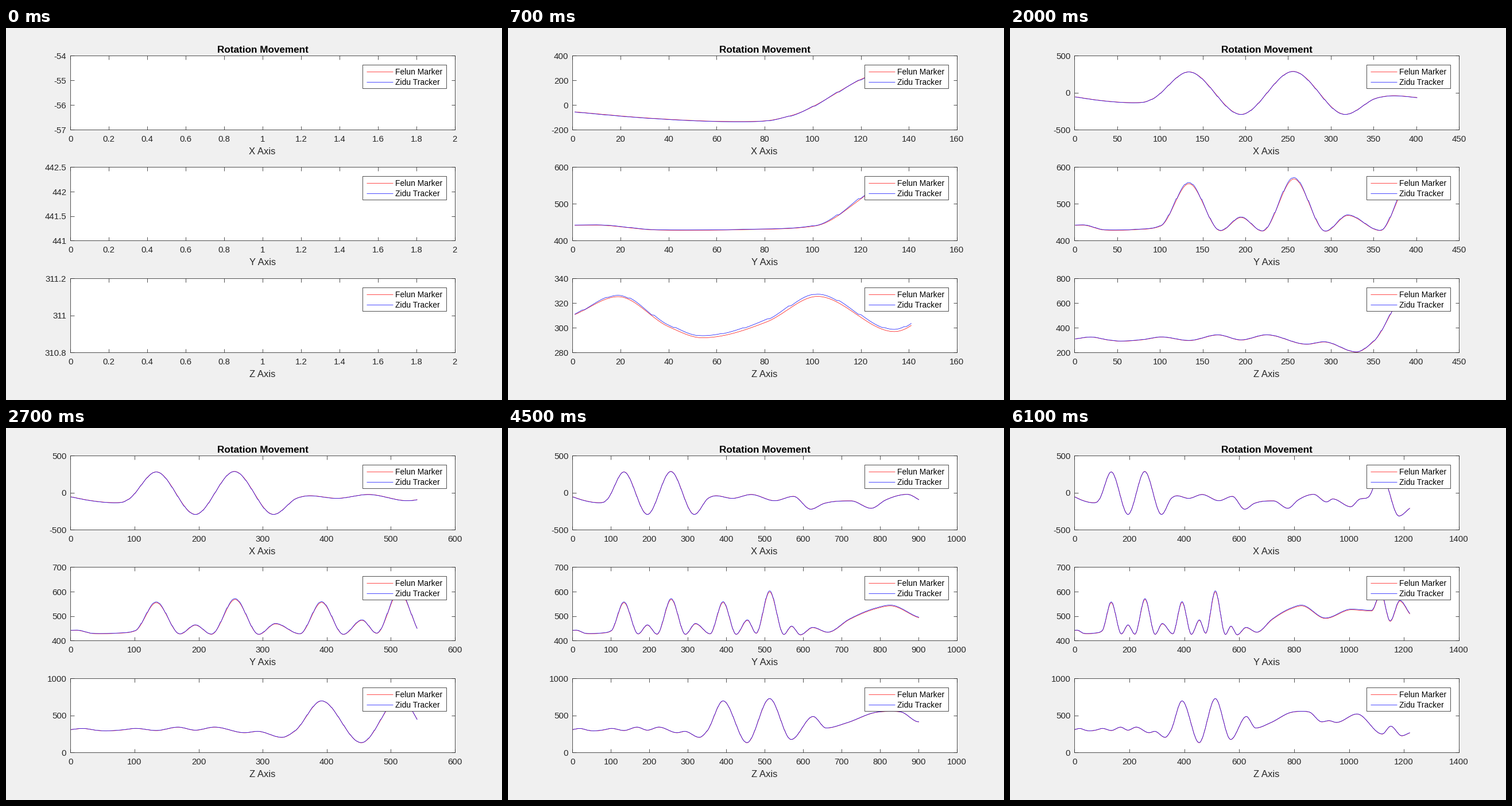
Animation, 864 px wide and 648 px high, one loop 6.2 s. Source, as a matplotlib script:

```python
import math

import matplotlib.pyplot as plt
import numpy as np
from matplotlib.animation import FuncAnimation
from matplotlib.patches import Rectangle

W, H = 864, 648
FRAMES, INTERVAL = 62, 100
SAMPLES_PER_FRAME = 20
LEFT, RIGHT = 112.3, 781.9
PANELS = [(48.4, 177.4), (242.4, 370.4), (436.4, 565.4)]
INK, RED, BLUE = "#262626", "#ff0000", "#0000ff"
FRAME_WIDTH, CURVE_WIDTH = 0.8, 0.7

plt.rcParams["font.family"] = "Liberation Sans"

# Turning points (sample, value) of the marker; easing fills in the rest.
TURNS_X = [
    (1, -54.2), (30, -102.5), (69, -133), (81, -126), (90, -90), (134, 283),
    (195, -291), (256, 289), (317, -291), (354, -70), (374, -39), (416, -74),
    (465, -22), (526, -106), (575, -47), (620, -220), (655, -142),
    (725, -108), (777, -208), (815, -95), (871, -20), (918, -122), (941, -82),
    (1006, -187), (1036, -90), (1071, -55), (1116, 270), (1182, -312),
    (1221, -208),
]
TURNS_Y = [
    (1, 441.45), (10, 442), (34, 429.2), (45, 428.3), (70, 429.8), (101, 440),
    (134, 555), (171, 427), (195, 463), (220, 426), (257, 568), (294, 425.5),
    (320, 468.5), (358, 427.5), (392, 556), (426, 425.5), (455, 483),
    (478, 430), (513, 599), (550, 425), (570, 458), (593, 423.5), (625, 453),
    (664, 434), (720, 486), (788, 530), (827, 542), (914, 490.5), (1008, 526),
    (1082, 521), (1116, 592), (1150, 479), (1185, 561), (1221, 509),
]
TURNS_Z = [
    (1, 310.85), (19, 325.3), (40, 301), (54, 292), (81, 305), (102, 325.5),
    (134, 297), (168, 342.5), (195, 301.5), (225, 343), (272, 267),
    (292, 286), (330, 204.5), (350, 289), (392, 697), (454, 133), (513, 728),
    (569, 176), (626, 486), (660, 331), (715, 403), (788, 541), (828, 556),
    (855, 547), (901, 414), (927, 430), (954, 406), (1029, 520), (1121, 250),
    (1152, 355), (1192, 226), (1221, 266),
]


def smooth(knots):
    """Cubic Hermite curve through the knots, flat at local extrema."""
    t, v = np.array(knots, float).T
    h = np.diff(t)
    d = np.diff(v) / h
    m = np.gradient(v, t)
    cap = 3 * np.minimum(abs(d[:-1]), abs(d[1:]))
    m[1:-1] = np.where(d[:-1] * d[1:] > 0, np.clip(m[1:-1], -cap, cap), 0)

    def curve(x):
        x = np.clip(x, t[0], t[-1])
        i = np.clip(np.searchsorted(t, x, side="right") - 1, 0, len(h) - 1)
        u = (x - t[i]) / h[i]
        ease = u * u * (3 - 2 * u)
        bend = u * (1 - u) * (m[i] * (1 - u) - m[i + 1] * u)
        return v[i] + (v[i + 1] - v[i]) * ease + h[i] * bend

    return curve


def signals(knots, error, n):
    """Marker and tracker values; the tracker clock runs fast, then stalls."""
    marker = smooth(knots)
    lead = 0.1 * ((n - 4.5) % 9.6) - 0.35
    return marker(n), error(marker(n + lead), n)


def nice_ticks(lo, hi, most):
    """Ticks on the finest 1-2-5 step that needs at most `most` intervals."""
    power = math.floor(math.log10((hi - lo) / most)) - 1
    while True:
        for base in (1, 2, 5):
            step = base * 10.0 ** power
            first = math.floor(round(lo / step, 9))
            last = math.ceil(round(hi / step, 9))
            if last - first <= most:
                return [k * step for k in range(first, last + 1)]
        power += 1


def apply_ticks(ax, xt, yt):
    ax.set_xticks(xt, [f"{v:g}" for v in xt])
    ax.set_yticks(yt, [f"{v:g}" for v in yt])
    ax.set_xlim(xt[0], xt[-1])
    ax.set_ylim(yt[0], yt[-1])


def make_panel(top, bottom):
    ax = fig.add_axes([LEFT / W, 1 - bottom / H,
                       (RIGHT - LEFT) / W, (bottom - top) / H])
    ax.tick_params(direction="in", length=6.5, width=FRAME_WIDTH, color=INK,
                   labelcolor=INK, labelsize=15, top=True, right=True)
    ax.tick_params(axis="x", pad=9.5)
    ax.tick_params(axis="y", pad=7)
    for spine in ax.spines.values():
        spine.set(color=INK, linewidth=FRAME_WIDTH)
    red, = ax.plot([], [], color=RED, lw=CURVE_WIDTH)
    blue, = ax.plot([], [], color=BLUE, lw=CURVE_WIDTH)
    return ax, red, blue


def draw_legend(top):
    page.add_patch(Rectangle((621, top + 15.8), 146, 41, fc="white",
                             ec=INK, lw=FRAME_WIDTH, zorder=3))
    entries = [("Felun Marker", RED, 27.8), ("Zidu Tracker", BLUE, 45.8)]
    for label, color, dy in entries:
        page.plot([628, 674], [top + dy] * 2, color=color, lw=CURVE_WIDTH,
                  zorder=4, solid_capstyle="butt")
        page.text(677.5, top + dy + 5, label, size=13.85, color="black",
                  zorder=4)


fig = plt.figure(figsize=(W / 72, H / 72), dpi=72, facecolor="#f0f0f0")
panels = [make_panel(*span) for span in PANELS]

# Overlay in pixel coordinates for titles and legends.
page = fig.add_axes([0, 0, 1, 1], zorder=5)
page.set(xlim=(0, W), ylim=(H, 0), autoscale_on=False)
page.axis("off")
page.text(447.3, 43, "Rotation Movement", size=17.1, weight="bold",
          ha="center")
for name, (top, bottom) in zip("XYZ", PANELS):
    page.text(446.6, bottom + 42.8, f"{name} Axis", size=16.6, color=INK,
              ha="center")
    draw_legend(top)

samples = np.arange(1, (FRAMES - 1) * SAMPLES_PER_FRAME + 2)
tracks = [
    signals(TURNS_X, lambda v, n: v - 1.8, samples),
    signals(TURNS_Y, lambda v, n: 1.02 * v - 7.8, samples),
    signals(TURNS_Z, lambda v, n: v + 1.8 * (1 - np.exp(-n / 20)), samples),
]


def update(frame):
    count = 1 + SAMPLES_PER_FRAME * frame
    x_ticks = nice_ticks(0, max(count, 2), 10)
    for (ax, red, blue), (marker, tracker) in zip(panels, tracks):
        a, b = marker[:count], tracker[:count]
        red.set_data(samples[:count], a)
        blue.set_data(samples[:count], b)
        lo, hi = min(a.min(), b.min()), max(a.max(), b.max())
        apply_ticks(ax, x_ticks, nice_ticks(lo, hi, 3))
    return []


anim = FuncAnimation(fig, update, frames=FRAMES, interval=INTERVAL,
                     repeat=True, repeat_delay=0, blit=False)
plt.show()
```
